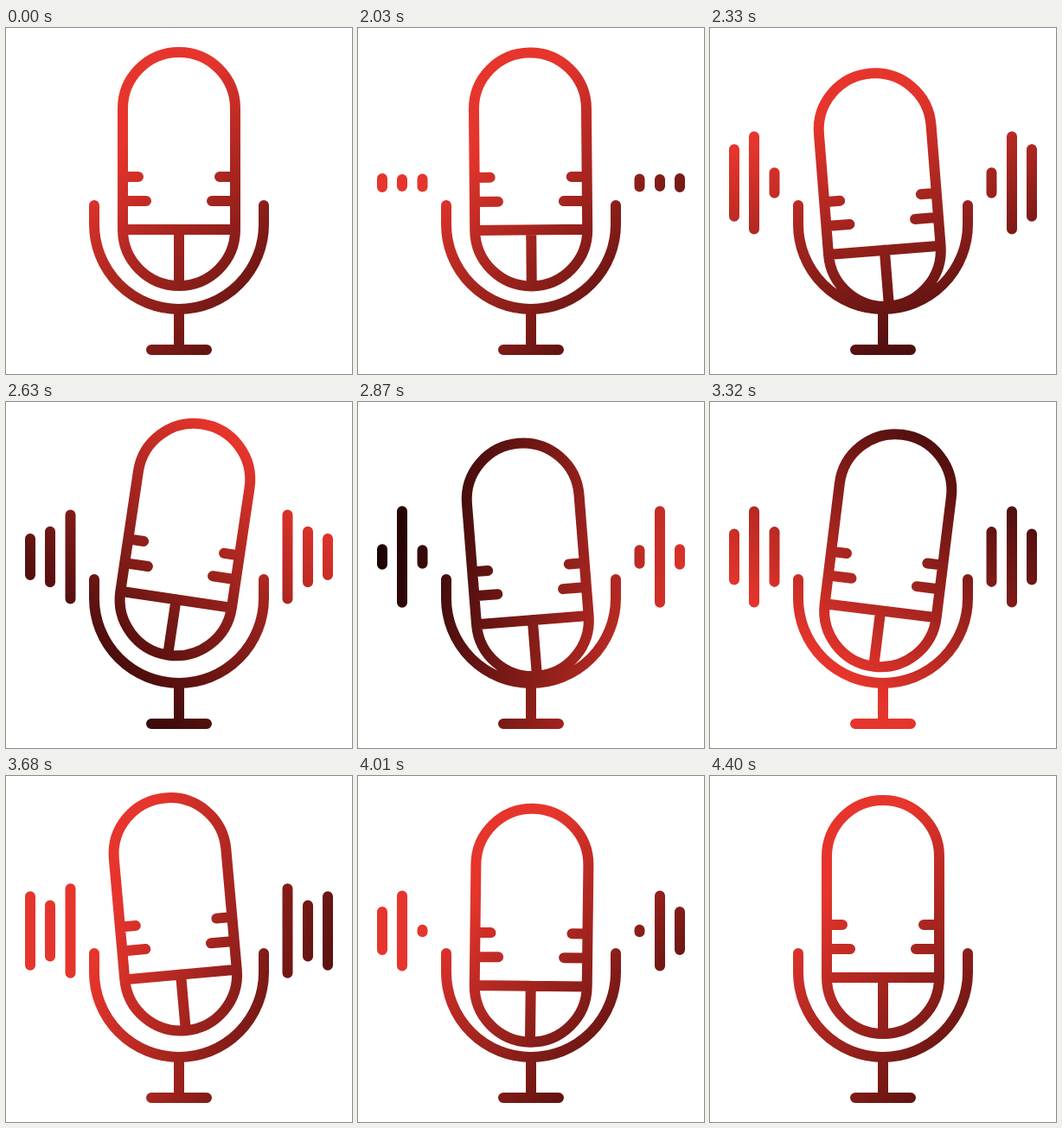
An HTML page with a canvas that plays this animation: 400x400 px, repeating every 4.43 s.

```html
<!DOCTYPE html>
<html lang="en">
<head>
<meta charset="utf-8">
<title>Microphone</title>
<style>
  html, body { margin: 0; height: 100%; overflow: hidden; background: #fff; }
  canvas { display: block; }
</style>
</head>
<body>
<canvas width="400" height="400"></canvas>
<script>
const LOOP = 4430, START = 2000, LENGTH = 2400, STEP = 30;
const BOUNCE_PERIOD = 575, TILT_PERIOD = 800, TURN_TIME = 2000;
const TAU = 2 * Math.PI;
const ctx = document.querySelector('canvas').getContext('2d');

const stand = new Path2D('M102 205V227A98 98 0 0 0 298 227V205M200 325V372M168 372H232');
const mic = new Path2D(
  'M135 93A65 65 0 0 1 265 93V233A65 65 0 0 1 135 233Z' +
  'M135 233H265M200 233V298' +
  'M135 172H153M135 200H162M265 172H247M265 200H238');

// Each pair of sound bars swings around a mean half height.
const bars = [
  { dx: 125.5, mean: 32, swing: 26, period: 524, phase: 1.34 },
  { dx: 149, mean: 46, swing: 14, period: 524, phase: -0.57 },
  { dx: 172, mean: 30, swing: 16, period: 1396, phase: 2.07 }
];

function bounce(t) {
  const swing = 16 * (1 - Math.cos(TAU * t / BOUNCE_PERIOD));
  const lift = 8 * Math.min(1, t / BOUNCE_PERIOD);
  return (swing - lift) * Math.sqrt(1 - t / LENGTH);
}

function tilt(t) {
  return -8.7 * Math.min(1, t / 120) * Math.sin(TAU * t / TILT_PERIOD);
}

function barHeight({ mean, swing, period, phase }, t) {
  const grow = Math.min(1, t / 200, (LENGTH - t) / 200);
  return grow * (mean - 6 - swing * Math.cos(TAU * t / period + phase));
}

function gradient(t) {
  const u = Math.min(1, t / TURN_TIME);
  const angle = TAU * (0.625 + u * u * (3 - 2 * u));
  const point = r => [252 + r * Math.cos(angle), 215 + r * Math.sin(angle)];
  const g = ctx.createLinearGradient(...point(140), ...point(-245));
  g.addColorStop(0, '#e6352c');
  g.addColorStop(1, '#140002');
  return g;
}

function draw(ms) {
  const elapsed = Math.floor((ms % LOOP - START) / STEP) * STEP;
  const t = Math.min(LENGTH, Math.max(0, elapsed));
  const shape = new Path2D(stand);
  const pose = new DOMMatrix()
    .translate(200, 210 + bounce(t))
    .rotate(tilt(t))
    .translate(-200, -210);
  shape.addPath(mic, pose);

  if (t > 0 && t < LENGTH) {
    for (const bar of bars) {
      const half = Math.max(0.1, barHeight(bar, t));
      for (const x of [200 - bar.dx, 200 + bar.dx]) {
        shape.moveTo(x, 179 - half);
        shape.lineTo(x, 179 + half);
      }
    }
  }

  ctx.fillStyle = '#fff';
  ctx.fillRect(0, 0, 400, 400);
  ctx.lineWidth = 12;
  ctx.lineCap = 'round';
  ctx.strokeStyle = gradient(t);
  ctx.stroke(shape);
}

const origin = performance.now();
function tick() {
  draw(performance.now() - origin);
  requestAnimationFrame(tick);
}
tick();
</script>
</body>
</html>
```
